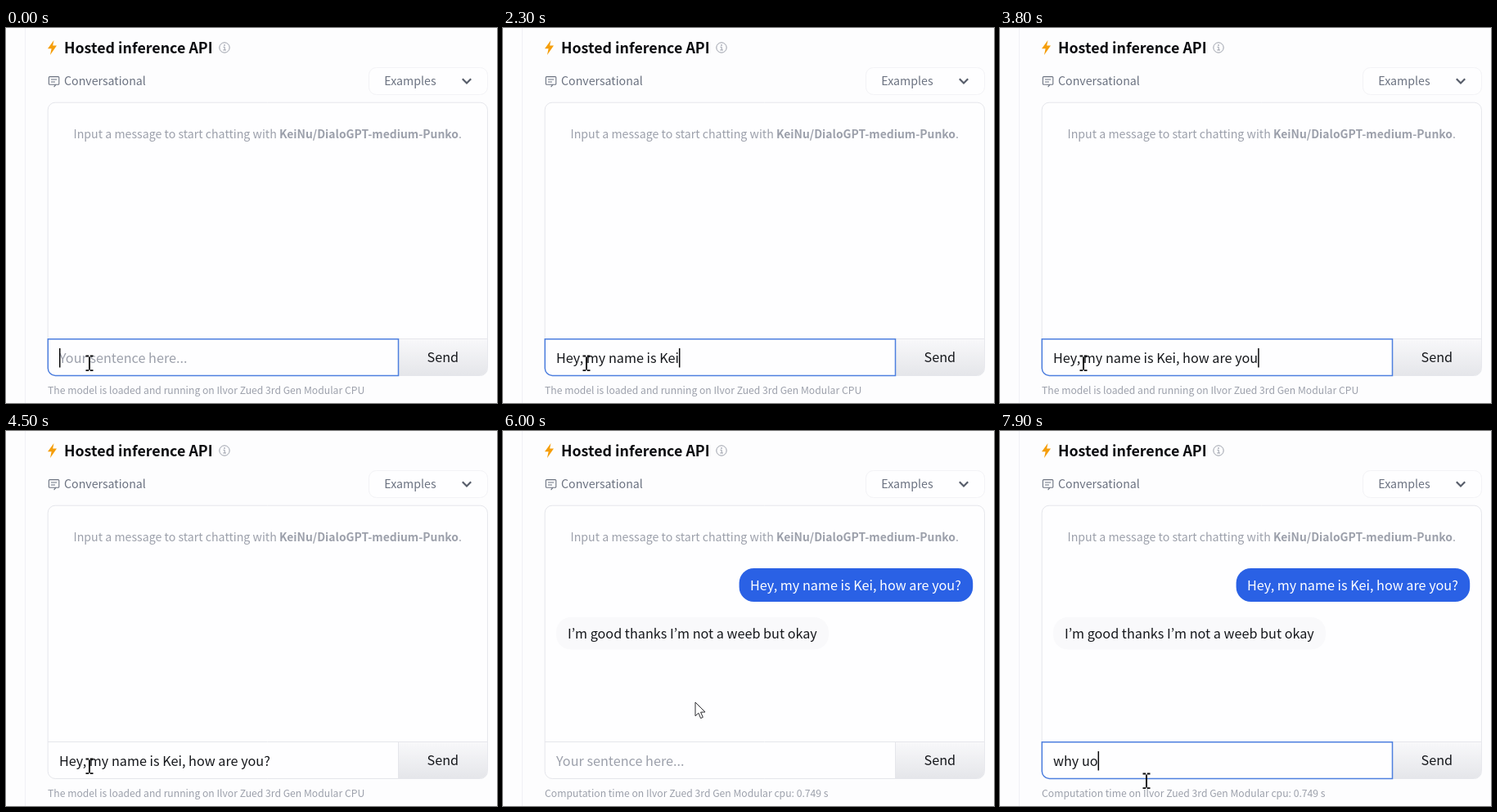
Recreate the animation shown at these times as an HTML page with a canvas. Size 600 px wide and 459 px high, loop 8 s.

```html
<!DOCTYPE html>
<html lang="en">
<head>
<meta charset="utf-8">
<title>Hosted inference chat</title>
<style>
  html, body { margin: 0; width: 100%; height: 100%; overflow: hidden; background: #fdfdfe; }
  canvas { display: block; }
</style>
</head>
<body>
<canvas id="stage" width="600" height="459"></canvas>
<script>
const ctx = document.getElementById('stage').getContext('2d');
const LOOP = 8000, STEP = 100;
const FAMILY = '"Noto Sans CJK JP", "Noto Sans CJK SC", "Noto Sans CJK KR", "Noto Sans CJK", "Noto Sans", sans-serif';
const SIZE = { title: 17.85, body: 16.22, small: 14.2, strong: 13.9, tiny: 12.18 };
const INK = '#15171b', GRAY = '#6b7280', PALE = '#9ca0ab', LINE = '#e5e6eb', BLUE = '#4d7fdf', PAPER = '#fefeff';

const SENT_AT = 4100, REPLY_AT = 4700, REFOCUS_AT = 6700;
const CHIP = 'Ilvor Zued 3rd Gen Modular';

// Each burst spreads its characters evenly over its time span.
const question = [
  { text: 'He', start: 100, end: 300 },
  { text: 'y, ', start: 600, end: 700 },
  { text: 'my name is Kei', start: 900, end: 2300 },
  { text: ', how a', start: 2600, end: 3400 },
  { text: 're you', start: 3500, end: 3800 },
  { text: '?', start: 4000, end: 4100 }
];
const followUp = [
  { text: 'wh', start: 7400, end: 7600 },
  { text: 'y uo', start: 7800, end: 7900 }
];
const questionText = question.map(burst => burst.text).join('');

const pointerHome = { x: 102, y: 410 };
const pointerMoves = [
  { start: 4500, end: 4700, x: 104, y: 411 },
  { start: 5100, end: 5700, x: 199, y: 416 },
  { start: 5700, end: 6000, x: 235, y: 332 },
  { start: 6200, end: 6700, x: 186, y: 412 },
  { start: 6700, end: 7100, x: 179, y: 428 }
];

const progress = (t, { start, end }) => Math.min(1, Math.max(0, (t - start) / (end - start)));

function typedText(bursts, t) {
  return bursts.filter(b => t >= b.start)
    .map(b => b.text.slice(0, 1 + Math.round(progress(t, b) * (b.text.length - 1))))
    .join('');
}

function pointerAt(t) {
  return pointerMoves.reduce((p, move) => {
    const k = progress(t, move);
    return { x: p.x + (move.x - p.x) * k, y: p.y + (move.y - p.y) * k };
  }, pointerHome);
}

function label(text, x, y, size, color, weight = 400) {
  ctx.font = `${weight} ${size}px ${FAMILY}`;
  ctx.fillStyle = color;
  ctx.fillText(text, x, y);
  return x + ctx.measureText(text).width;
}

function box(x, y, w, h, radii, fill, stroke, width = 1) {
  ctx.beginPath();
  ctx.roundRect(x, y, w, h, radii);
  if (fill) { ctx.fillStyle = fill; ctx.fill(); }
  if (stroke) { ctx.strokeStyle = stroke; ctx.lineWidth = width; ctx.stroke(); }
}

function line(path, color, width = 1) {
  ctx.strokeStyle = color;
  ctx.lineWidth = width;
  ctx.stroke(new Path2D(path));
}

function shape(path, color) {
  ctx.fillStyle = color;
  ctx.fill(new Path2D(path));
}

function drawHeader() {
  line('M23.5 0V459', '#f1f1f5');
  shape('M58.5 15L51 25.3H55.6L54 33L62 21.6H57.2Z', '#f59e0b');
  label('Hosted inference API', 71, 31, SIZE.title, '#0a0b0f', 600);

  box(260.8, 17.8, 12.4, 12.4, 6.2, null, PALE);
  line('M265.5 23.3H267.2V27M265.3 27H269', PALE);
  shape('M266.2 20.2h1.6v1.6h-1.6z', PALE);

  box(52.4, 59.6, 12.4, 9.7, 1, null, GRAY, 1.1);
  line('M60.8 69.3L58.6 72.2M55 63H62.2M55 66H60', GRAY, 1.1);
  label('Conversational', 71, 70, SIZE.small, GRAY);

  box(443.5, 48.5, 145, 33, 9, PAPER, '#f3f3f6');
  label('Examples', 462.3, 70, SIZE.small, GRAY);
  line('M557.8 62.3l5.2 5.2l5.2 -5.2', '#565c69', 2.2);
}

function drawPanel(focused) {
  box(51.2, 91.2, 537.2, 334.3, 9, PAPER, LINE);
  const nameX = label('Input a message to start chatting with ', 82.5, 135, SIZE.small, PALE);
  const endX = label('KeiNu/DialoGPT-medium-Punko', nameX, 135, SIZE.strong, PALE, 600);
  label('.', endX, 135, SIZE.small, PALE);

  const shade = ctx.createLinearGradient(0, 381, 0, 425);
  shade.addColorStop(0, '#f8f8fa');
  shade.addColorStop(1, '#e5e6ea');
  box(480, 381, 108, 44, [0, 0, 8, 0], shade);
  line('M51 380.5H588M479.5 381V425', LINE);
  label('Send', 514.5, 409, SIZE.body, INK);

  if (focused) box(51.3, 380.8, 428.2, 44.6, [0, 0, 0, 9], PAPER, BLUE, 1.5);
}

function drawInput(t, focused) {
  const typed = typedText(t < REPLY_AT ? question : followUp, t);
  let caretX = 65;
  if (typed) caretX = label(typed, 65, 410, SIZE.body, INK);
  else label('Your sentence here...', 65, 410, SIZE.body, PALE);

  const blinkedOff = t >= 7200 && t < 7400;
  if (focused && !blinkedOff) {
    ctx.fillStyle = '#08080a';
    ctx.fillRect(caretX, 392, 1.5, 23.5);
  }
}

function drawReply() {
  box(288.6, 168, 285.6, 41, 18, '#2a61e5');
  label(questionText, 302, 194.8, SIZE.body, '#fff');
  box(65, 228, 333, 39.5, 18, '#f9f9fb');
  label('I’m good thanks I’m not a weeb but okay', 79, 253.6, SIZE.body, INK);
}

function drawPointer(t) {
  const { x, y } = pointerAt(t);
  ctx.save();
  ctx.translate(x, y);
  if (y > 380) {
    line('M0 -7.5V8.5', '#0a0a0c', 2);
    line('M-4.5 -8.5H-.8M.8 -8.5H4.5M-4.5 9.2H-.8M.8 9.2H4.5', '#0a0a0c', 1.8);
  } else {
    const arrow = 'M0 0V16.8L3.9 13.2L6.6 19.6L9.3 18.4L6.6 12.2L12 12Z';
    shape(arrow, '#fff');
    line(arrow, '#2c2c30');
  }
  ctx.restore();
}

function draw(t) {
  const focused = t < SENT_AT || t >= REFOCUS_AT;
  const answered = t >= REPLY_AT;
  ctx.fillStyle = '#fdfdfe';
  ctx.fillRect(0, 0, 600, 459);
  drawHeader();
  drawPanel(focused);
  if (answered) drawReply();
  drawInput(t, focused);
  const status = answered
    ? `Computation time on ${CHIP} cpu: 0.749 s`
    : `The model is loaded and running on ${CHIP} CPU`;
  label(status, 51, 448, SIZE.tiny, PALE);
  drawPointer(t);
}

const start = performance.now();
function tick() {
  const t = (performance.now() - start) % LOOP;
  draw(Math.floor(t / STEP) * STEP);
  requestAnimationFrame(tick);
}
tick();
</script>
</body>
</html>
```
